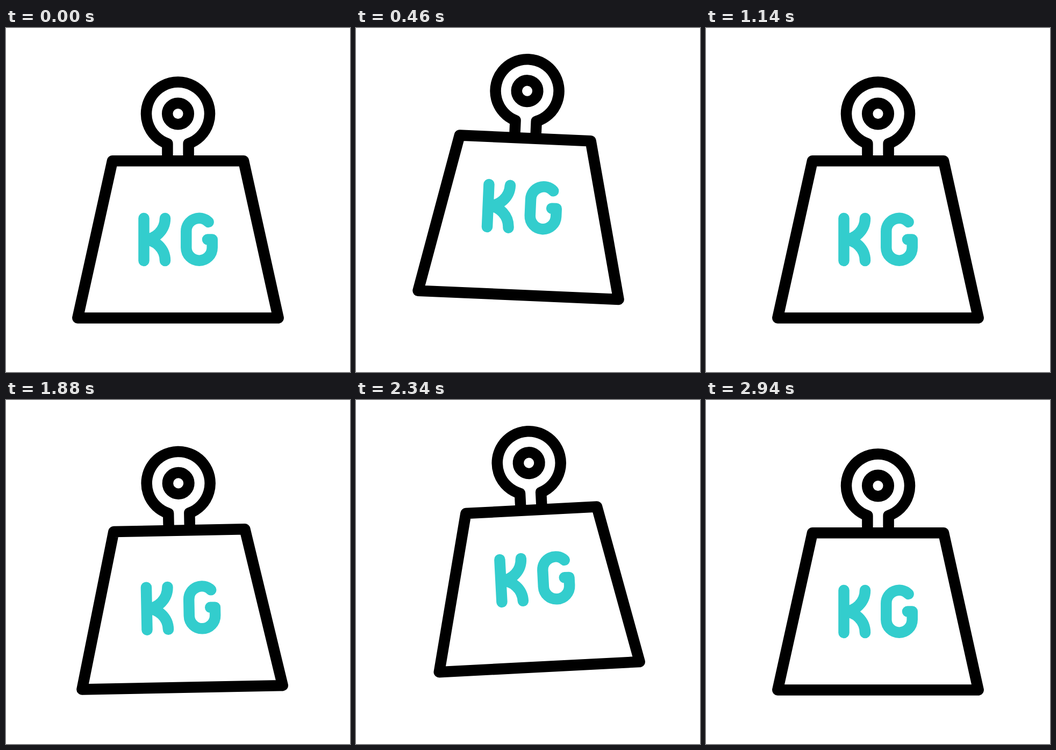
These frames come from a looping animation (640 by 640 pixels, 3600 ms). An HTML page:

```html
<!DOCTYPE html>
<html lang="en">
<head>
<meta charset="utf-8">
<title>Weight</title>
<style>
html, body { margin: 0; width: 100%; height: 100%; overflow: hidden; background: #fff; }
svg { display: block; width: 100%; height: 100%; fill: none; stroke: #000; stroke-width: 20.5; stroke-linecap: round; stroke-linejoin: round; }
.teal { stroke: #33cdcd; }
</style>
</head>
<body>
<svg viewBox="0 0 640 640">
  <g id="weight">
    <path stroke-linecap="butt" d="M300.4 247V215.2A59 59 0 1 1 339.6 215.2V247"/>
    <circle cx="320" cy="159.5" r="19.8"/>
    <path d="M198 247.3H442L506.7 539.5H133.3Z"/>
    <g id="label" class="teal">
      <path d="M256.5 354V433M296 354A39.5 39.5 0 0 1 256.5 393.5A39.5 39.5 0 0 1 296 433"/>
      <path d="M376.7 361A24.2 24.2 0 0 0 335.3 378V408.5A24.2 24.2 0 0 0 383.7 408.5V393.5H375"/>
    </g>
  </g>
  <path id="streaks" class="teal"/>
</svg>
<script>
const LOOP = 3600, STEP = 20;
const LIFT = 533, RISE = 187, HEIGHT = 42.3;
const rounds = [{ start: 107, settle: 500 }, { start: 1867, settle: 540 }];
const get = id => document.getElementById(id);
const clamp = x => Math.min(1, Math.max(0, x));
const ease = x => (1 - Math.cos(Math.PI * clamp(x))) / 2;

// Eased value at time t through [time, value] keys
function through(t, ...keys) {
  let value = keys[0][1];
  for (let i = 1; i < keys.length; i++) {
    const [t0, v0] = keys[i - 1], [t1, v1] = keys[i];
    value += (v1 - v0) * ease((t - t0) / (t1 - t0));
  }
  return value;
}

function draw(time) {
  const { start, settle } = rounds[time < rounds[1].start ? 0 : 1];
  const t = time - start, drop = t - LIFT;

  const rise = Math.sin(clamp(t / RISE) * Math.PI / 2);
  const y = -HEIGHT * (rise - ease(drop / RISE));
  const shake = -3 * Math.sin(5 * Math.PI * clamp(t / LIFT));
  const rock = through(drop, [0, 0], [170, -1.09], [270, 2.7], [375, -1.5], [settle, 0]);
  const labelY = drop < 0 ? -60 * rise : through(drop, [0, -60], [240, 30], [settle - 40, 0]);

  get("weight").setAttribute("transform",
    `translate(0 ${y}) rotate(${shake} 320 126) rotate(${rock} 320 539.5)`);
  get("label").setAttribute("transform", `translate(0 ${labelY - y})`);

  const head = 230 * ease((drop - 33) / 280);
  const tail = 230 * ease((drop - 185) / 260);
  const streak = (x, top) => `M${x} ${top + tail}V${top + head}`;
  get("streaks").setAttribute("d", head - tail > 0.5 ? streak(526.3, 160.3) + streak(561.5, 80) : "");
}

function tick() {
  draw(Math.floor(performance.now() % LOOP / STEP) * STEP);
  requestAnimationFrame(tick);
}
tick();
</script>
</body>
</html>
```
